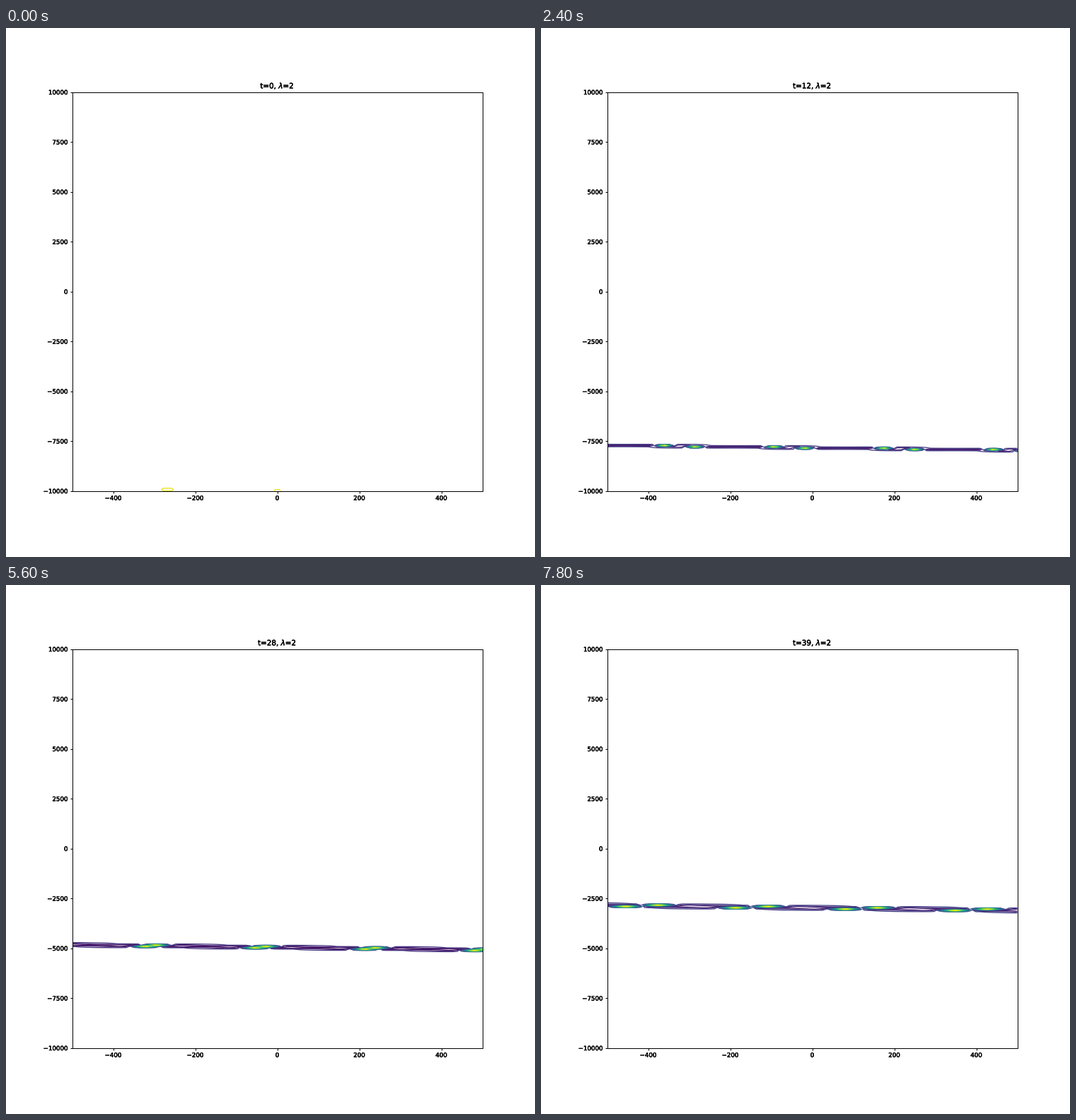
Animation, 748 px wide and 748 px high, one loop 8000 ms. Source, as a matplotlib script:

```python
import numpy as np
import matplotlib.pyplot as plt
from matplotlib.animation import FuncAnimation
from matplotlib.patheffects import withStroke

SIZE, DPI = 748, 68
PX = 72 / DPI  # one pixel in points
K = 11 / 12    # point sizes are for a 12 inch figure
plt.rcParams.update({
    "font.family": "DejaVu Sans",
    "font.size": 10 * K,
    "axes.titlesize": 12 * K,
    "axes.titlepad": 6 * K,
    "axes.linewidth": PX,
    "lines.linewidth": 1.5 * K,
})
for a in ("xtick", "ytick"):
    plt.rcParams.update({
        f"{a}.labelsize": 10 * K,
        f"{a}.major.size": 3.5 * K,
        f"{a}.major.width": PX,
        f"{a}.major.pad": 3.5 * K,
    })

LAM = 2
STEPS = 40
SPLIT, WIDTH, BASIN = 27.7, 7.5, 47  # lengths in units of sqrt(t)
HEAVY = [withStroke(linewidth=0.5 * PX, foreground="black")]

x = np.linspace(-500, 500, 100)
y = np.linspace(-10000, 10000, 300)
X, Y = np.meshgrid(x, y)

fig = plt.figure(figsize=(SIZE / DPI, SIZE / DPI), dpi=DPI, facecolor="white")
ax = fig.add_axes([93.5 / SIZE, 93.5 / SIZE, 580 / SIZE, 564 / SIZE])


def pulse(d):
    """Rational pulse: a positive peak with negative troughs beside it."""
    return 4 * (WIDTH**2 - d**2) / (WIDTH**2 + d**2) ** 2


def basin(z):
    """Shallow dip around the pair of pulses, with a positive far field."""
    q = z / BASIN
    return 0.008 * (q**4 - 0.2) / (1 + q**6)


def field(t):
    s = X + LAM**2 * (Y + 10000) - 45 * LAM**4 * t
    if t == 0:
        return np.where(abs(s) < 12, -1, 520 / s**2)
    z = s / np.sqrt(t)
    return (pulse(z - SPLIT) + pulse(z + SPLIT) + basin(z)) / t


def draw(t):
    ax.clear()
    if t == 0:
        ax.contour(X, Y, field(t), levels=[0], colors=["#e6e41e"])
    else:
        ax.contour(X, Y, field(t), 20, cmap="viridis")
    ax.set(xlim=(-500, 500), ylim=(-10000, 10000),
           xticks=range(-400, 401, 200), yticks=range(-10000, 10001, 2500))
    title = ax.set_title(rf"t={t}, $\lambda$={LAM}")
    for text in [title, *ax.get_xticklabels(), *ax.get_yticklabels()]:
        text.set_path_effects(HEAVY)
    return ax.get_children()


anim = FuncAnimation(fig, draw, frames=STEPS, interval=200,
                     repeat=True, repeat_delay=0, blit=False)
plt.show()
```
